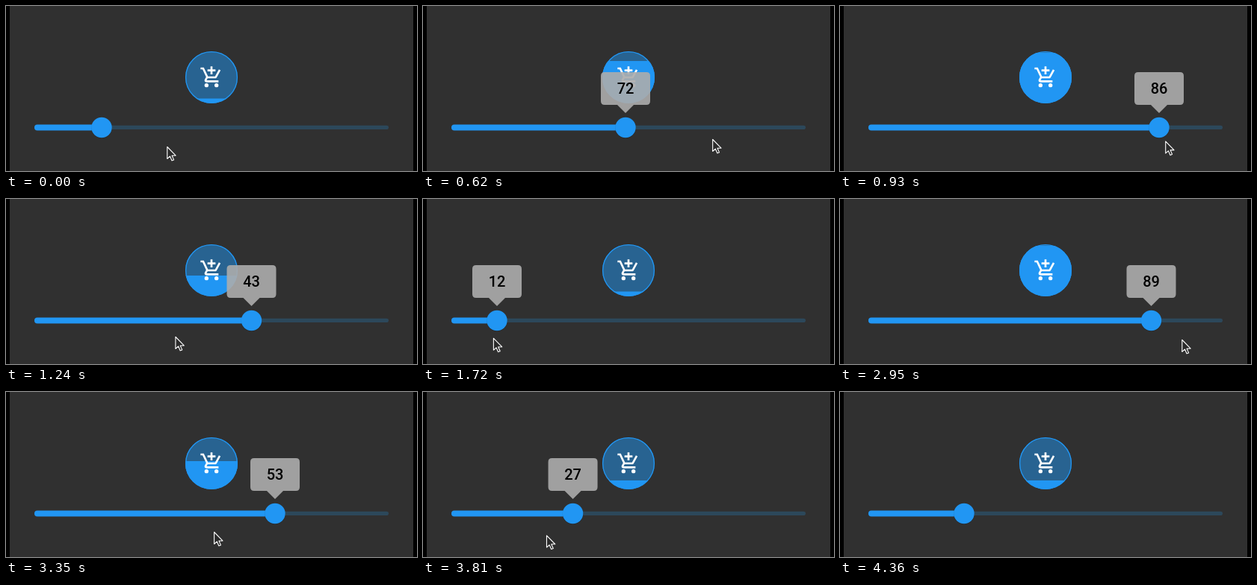
These frames come from a looping animation (550 by 222 pixels, 4860 ms). An HTML page:

```html
<!DOCTYPE html>
<html lang="en">
<head>
<meta charset="utf-8">
<title>Slider filling a cart button</title>
<style>
  html, body { margin: 0; width: 100%; height: 100%; overflow: hidden; background: #000; }
  svg { display: block; width: 550px; height: 222px; }
  text { font: 500 20px Roboto, Arial, sans-serif; text-anchor: middle; }
</style>
</head>
<body>
<svg viewBox="0 0 550 222">
  <defs>
    <clipPath id="disc"><circle cx="275" cy="96" r="35"/></clipPath>
  </defs>
  <rect x="5" width="540" height="222" fill="#303030"/>

  <g clip-path="url(#disc)">
    <rect x="240" y="61" width="70" height="70" fill="#286391"/>
    <rect id="level" x="240" width="70" height="80" fill="#2196f3"/>
  </g>
  <circle cx="275" cy="96" r="34.4" fill="none" stroke="#2196f3" stroke-width="1.3"/>

  <g transform="translate(259 80) scale(1.333)" fill="#fff">
    <path d="M11 9h2V6h3V4h-3V1h-2v3H8v2h3z"/>
    <circle cx="7" cy="20" r="2"/>
    <circle cx="17" cy="20" r="2"/>
    <path d="M7.17 14.75l.93-1.75h7.45c.75 0 1.41-.41 1.75-1.03l3.86-7.01L19.42 4l-3.87 7H8.53L4.27 2H1v2h2l3.6 7.59-1.35 2.45C4.52 15.37 5.48 17 7 17h12v-2H7.42c-.14 0-.25-.11-.25-.25z"/>
  </g>

  <rect x="38" y="160.8" width="474" height="5.3" rx="2.65" fill="#2c485b"/>
  <rect id="active" x="38" y="159.5" height="8" rx="4" fill="#2196f3"/>
  <g id="thumb">
    <circle cy="164.3" r="13.8" fill="#000" opacity=".2"/>
    <circle cy="163.5" r="13.7" fill="#2196f3"/>
  </g>

  <g id="tip">
    <path d="M-28 89H28q5 0 5 5V128q0 5-5 5H11L0 144-11 133H-28q-5 0-5-5V94q0-5 5-5z"
          fill="#acacac" opacity=".9"/>
    <text id="label" y="118.4"></text>
  </g>

  <path id="cursor" d="M.5.5V16.5L4.2 13.2 6.7 19 9.3 17.9 6.8 12.2H11.8z"
        fill="#2b2b2b" stroke="#fff" stroke-width="1.1" stroke-linejoin="round"/>
</svg>
<script>
const LOOP = 4860, FIRST = 74, STEP = 77.7;   // ms
const RELEASE = 54, LAST = 56;                // steps
const REST = 19, LEFT = 38, WIDTH = 474;
const el = id => document.getElementById(id);
const clamp = (x, lo, hi) => Math.min(hi, Math.max(lo, x));
const move = (id, x, y, more = "") =>
  el(id).setAttribute("transform", `translate(${x} ${y}) ${more}`);

// Smooth curve through [step, position] points, level at every turning point.
function curve(points) {
  const slope = i => {
    const [a, b, c] = [points[i - 1], points[i], points[i + 1]];
    if (!a || !c || (b[1] - a[1]) * (c[1] - b[1]) <= 0) return 0;
    return (c[1] - a[1]) / (c[0] - a[0]);
  };
  return n => {
    const i = points.findIndex(p => p[0] > n) - 1;
    if (i < 0) return points[points.length - 1][1];
    const [n0, a] = points[i], [n1, b] = points[i + 1];
    const d = n1 - n0, u = (n - n0) / d, w = 1 - u;
    return a + (b - a) * u * u * (3 - 2 * u)
      + d * u * w * (slope(i) * w - slope(i + 1) * u);
  };
}

const value = curve([[0, 37.5], [8, 72], [11, 90], [16, 43], [20, 12], [24, 12],
  [30, 33], [38, 89], [43, 53], [48, 27]]);
const thumbX = curve([[0, 128], [4, 150], [8, 271], [12, 427], [16, 328.5], [22, 99],
  [30, 167.5], [34, 240], [38, 416.5], [40, 449], [43, 360], [52, 166]]);
const pointerY = curve([[0, 189], [8, 179], [16, 185], [38, 189], [43, 188], [54, 196]]);
// The pointer runs a third of a step ahead of the value it sets.
const pointerX = n => LEFT + WIDTH * value(n + 1 / 3) / 100 - 1;

function draw(time) {
  const n = clamp(Math.floor((time - FIRST) / STEP) + 1, 0, LAST);
  const v = n ? value(n) : REST, x = thumbX(n);
  const grow = n < RELEASE ? Math.min(1, n / 2) : 0;

  el("level").setAttribute("y", clamp(146 - v, 63, 124.5));
  el("active").setAttribute("width", x - LEFT);
  move("thumb", x, 0);
  move("tip", x, 144 * (1 - grow), `scale(${grow})`);
  el("label").textContent = Math.round(v);
  move("cursor", pointerX(n), pointerY(n));
  el("cursor").setAttribute("visibility", n < LAST ? "visible" : "hidden");
}

const start = performance.now();
function frame() {
  draw((performance.now() - start) % LOOP);
  requestAnimationFrame(frame);
}
frame();
</script>
</body>
</html>
```
